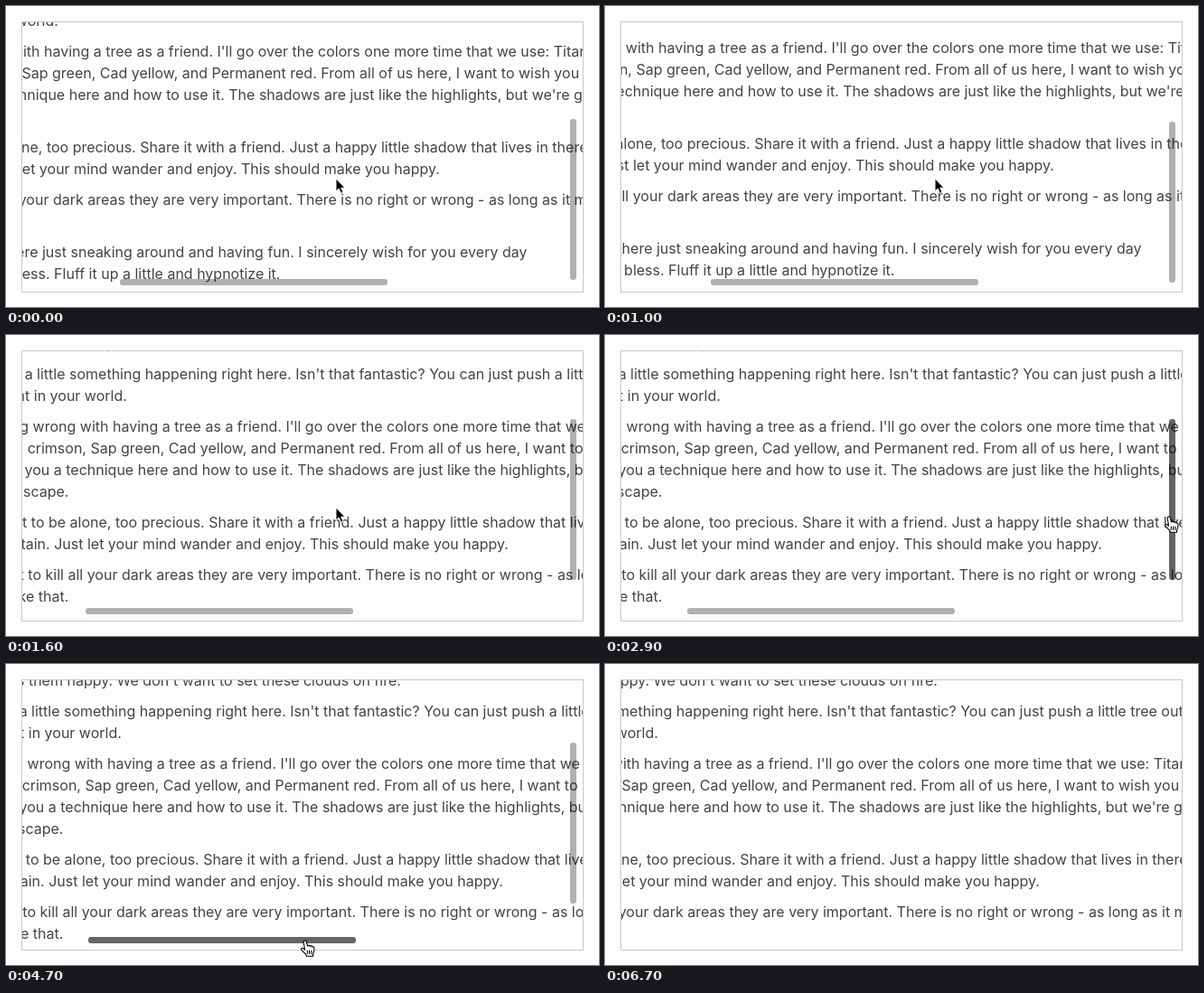
Write an HTML page that moves like this. It is 656x333 px and loops after 6.73 s.

```html
<!DOCTYPE html>
<html lang="en">
<head>
<meta charset="utf-8">
<title>Overlay scrollbars</title>
<style>
  html, body { margin: 0; width: 100%; height: 100%; overflow: hidden; background: #fdfdfd; }
  svg { display: block; }
  text { font: 16px Inter, "Liberation Sans", sans-serif; fill: #444; }
</style>
</head>
<body>
<svg width="656" height="333" viewBox="0 0 656 333">
  <defs><clipPath id="view"><rect x="18" y="18" width="620" height="298"/></clipPath></defs>
  <g clip-path="url(#view)"><g id="content"></g></g>
  <rect x="17.5" y="17.5" width="621" height="299" fill="none" stroke="#c9c9c9"/>
  <rect id="barY" x="624" width="7" height="178" rx="3"/>
  <rect id="barX" y="302" width="296" height="7" rx="3"/>
  <g id="cursor">
    <path id="arrow" d="M0 0V14L3.2 11L5.5 16.4L8 15.3L5.8 10.2H10Z" stroke="#fff" stroke-linejoin="round"/>
    <g id="hand" stroke="#000" stroke-width="1.1" stroke-linejoin="round" stroke-linecap="round">
      <path fill="#fff" d="M-1.8 2C-2.3 0 .6-.8 1.2 1L2.6 6C3.5 5 5 5.2 5.4 6.2C6.5 5.5 7.6 5.8 8 7C9.5 6.5 10 7.5 10 9C10.2 12 9 13 8.6 15V17.2H1.5L.8 15.5C-1 13.5-3 11.5-4.3 9.8C-5 8.6-3.5 7.5-2.2 8.8L-.4 10.2Z"/>
      <path fill="none" d="M2.3 11v3.5M4.6 11v3.5M6.9 11v3.5"/>
    </g>
  </g>
</svg>
<script>
const LOOP = 6730;
const LINE = 24, PARAGRAPH_GAP = 10, LEFT = -99.5;
const $ = id => document.getElementById(id);

const story = `and then makes them happy. We don't want to set these clouds on fire.

Maybe we see a little something happening right here. Isn't that fantastic? You can just push a little tree out of your brush and do all
things you want in your world.

There's nothing wrong with having a tree as a friend. I'll go over the colors one more time that we use: Titanium white, Thalo green,
brown, Alizarin crimson, Sap green, Cad yellow, and Permanent red. From all of us here, I want to wish you happy painting.
I want to show you a technique here and how to use it. The shadows are just like the highlights, but we're going in the colors
of our little seascape.

Life is too short to be alone, too precious. Share it with a friend. Just a happy little shadow that lives in there. Trees grow
over our mountain. Just let your mind wander and enjoy. This should make you happy.

You don't want to kill all your dark areas they are very important. There is no right or wrong - as long as it makes
your dreams like that.

We see gray clouds in here just sneaking around and having fun. I sincerely wish for you every day
is happy painting, God bless. Fluff it up a little and hypnotize it.`;

// An empty line in the story is a paragraph gap.
let baseline = 0;
for (const line of story.split("\n")) {
  if (!line) {
    baseline += PARAGRAPH_GAP;
    continue;
  }
  const node = document.createElementNS("http://www.w3.org/2000/svg", "text");
  node.setAttribute("x", LEFT);
  node.setAttribute("y", baseline);
  node.textContent = line;
  $("content").append(node);
  baseline += LINE;
}

// Smooth progress from 0 to 1 between two times.
function ease(t, from, to) {
  const p = Math.min(1, Math.max(0, (t - from) / (to - from)));
  return p * p * (3 - 2 * p);
}
const pulse = (t, from, to) => ease(t, from, from + 100) - ease(t, to, to + 100);

function place(node, x, y) {
  node.setAttribute("transform", `translate(${Math.round(x)} ${Math.round(y)})`);
}
function show(node, visible) {
  node.style.display = visible ? "" : "none";
}

function render(t) {
  // Two trackpad swipes, then a drag of each scrollbar.
  const scrollX = 70 - 17 * ease(t, 0, 1000) - 59 * ease(t, 1000, 1600) + 6 * ease(t, 1600, 1900)
    + 97 * ease(t, 5000, 5500) - 28 * ease(t, 5500, 5950);
  const textY = -36 - 4 * ease(t, 0, 1000) + 55 * ease(t, 1000, 1600)
    + 24 * ease(t, 2850, 3560) - 15 * ease(t, 3560, 4050);
  const thumbX = scrollX / 2.02, thumbY = (15 - textY) * .635;
  place($("content"), -scrollX, textY);
  place($("barX"), 91 + thumbX, 0);
  place($("barY"), 0, 93 + thumbY);

  const visible = 1 - ease(t, 6330, 6660);
  $("barX").setAttribute("fill-opacity", (.3 + .3 * pulse(t, 4580, 6000)) * visible);
  $("barY").setAttribute("fill-opacity", (.3 + .3 * pulse(t, 2600, 4190)) * visible);

  // The pointer carries the thumbs along once the swipes are over.
  const held = t > 2150 ? 1 : 0;
  const reach = ease(t, 2150, 2700), descend = ease(t, 4200, 4680);
  const grab = ease(t, 4930, 5000), leave = ease(t, 5980, 6200);
  place($("cursor"),
    365 + 259 * reach - 293 * descend - 8 * grab - 7 * leave + held * thumbX,
    191 + 10 * reach + 111 * descend - 4 * grab + 34 * leave + held * thumbY);
  const pointing = (t > 2640 && t < 4250) || (t > 4610 && t < 6040);
  show($("hand"), pointing);
  show($("arrow"), !pointing);
  show($("cursor"), t < 6200);
}

const start = performance.now();
function tick() {
  render((performance.now() - start) % LOOP);
  requestAnimationFrame(tick);
}
tick();
</script>
</body>
</html>
```
